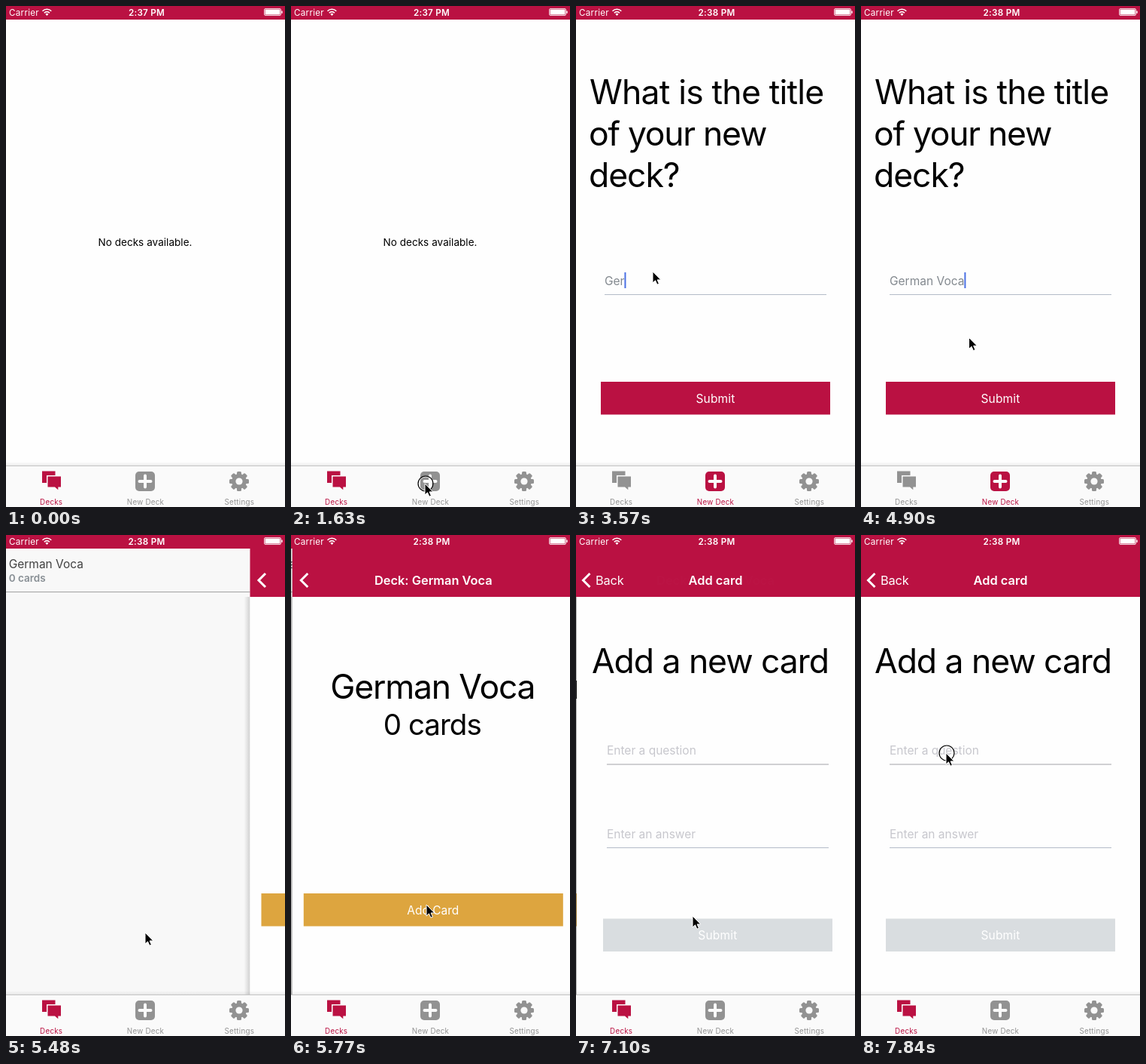
Recreate the animation shown at these times as an HTML page. Size 371 by 664 pixels, loop 7.99 s.

```html
<!DOCTYPE html>
<html lang="en">
<head>
<meta charset="utf-8">
<title>Flashcards</title>
<style>
html, body { margin: 0; height: 100%; overflow: hidden; background: #fefefe; }
svg { display: block; width: 371px; height: 664px; overflow: hidden; }
text { font: 15.5px Inter, Roboto, sans-serif; font-optical-sizing: none; white-space: pre; }
.mid { text-anchor: middle; }
.big { font-size: 44.5px; letter-spacing: -1.05px; }
.bar text { font-size: 16.4px; fill: #fff; }
.bar .title { font-weight: 600; }
.status text { font-size: 11.7px; letter-spacing: .25px; fill: #fff; }
.tab text { font-size: 9.8px; letter-spacing: .25px; }
.tab { fill: #929292; }
.tab.on, .red { fill: #ba1142; }
.page { fill: #fefefe; }
.hint { fill: #c7c7cd; }
.off { fill: #d9dde0; }
.white { fill: #fff; }
.rule { stroke: #b4bcc8; }
</style>
</head>
<body>
<svg viewBox="0 0 371 664">
  <defs>
    <linearGradient id="side"><stop stop-opacity="0"/><stop offset="1" stop-opacity=".16"/></linearGradient>
    <linearGradient id="up" x2="0" y2="1"><stop stop-opacity="0"/><stop offset="1" stop-opacity=".08"/></linearGradient>
  </defs>
  <rect class="page" width="371" height="664"/>

  <text id="empty" class="mid" x="185" y="318" style="font-size:13.5px;letter-spacing:.05px">No decks available.</text>

  <g id="form">
    <text class="big" x="18" y="130" style="letter-spacing:-.8px">What is the title</text>
    <text class="big" x="17" y="185" style="letter-spacing:-1.25px">of your new</text>
    <text class="big" x="17" y="240">deck?</text>
    <text id="hint" class="hint" x="38" y="370">Enter a title</text>
    <text id="typed" x="38" y="370" fill="#83898f"></text>
    <rect id="caret" y="353" width="2" height="21" fill="#4a70e4"/>
    <path class="rule" d="M38 382.5H333"/>
    <rect id="submit" x="33" y="498" width="305" height="43.5"/>
    <text class="mid white" x="185.5" y="525.5" style="letter-spacing:.2px">Submit</text>
  </g>

  <g id="list">
    <g id="listBody">
      <text x="17" y="44" fill="#444">German Voca</text>
      <text x="17" y="62" fill="#8b9298" style="font-size:13.5px;font-weight:600">0 cards</text>
      <path d="M0 75.5H400" stroke="#a4a4a4"/>
    </g>
    <rect id="listShade" y="18" width="371" height="592"/>
  </g>

  <g id="deck">
    <rect x="-10" y="82" width="8" height="528" fill="url(#side)"/>
    <rect class="page" x="-2" y="18" width="373" height="592"/>
    <g id="deckBody">
      <text class="big mid" x="184.5" y="217" style="letter-spacing:-1.2px">German Voca</text>
      <text class="mid" x="184" y="265" style="font-size:38.5px;letter-spacing:-1px">0 cards</text>
      <rect x="13" y="475" width="345" height="43.5" fill="#dda53f"/>
      <text class="mid white" x="185" y="502.5">Add Card</text>
    </g>
    <rect id="deckShade" y="82" width="371" height="528"/>
    <g id="card">
      <rect x="-10" y="82" width="8" height="528" fill="url(#side)"/>
      <rect class="page" x="-2" y="82" width="373" height="528"/>
      <text class="big" x="18" y="183">Add a new card</text>
      <text class="hint" x="38" y="291">Enter a question</text>
      <path d="M38 304H333" stroke="#d0d0d3" stroke-width="2"/>
      <text class="hint" x="38" y="402">Enter an answer</text>
      <path class="rule" d="M38 414.5H333"/>
      <rect class="off" x="33" y="508.5" width="305" height="43.5"/>
      <text class="mid white" x="185.5" y="536" style="letter-spacing:.2px">Submit</text>
    </g>
    <g class="bar">
      <rect class="red" x="-2" y="17" width="373" height="65"/>
      <path d="M18.5 51 9.5 60l9 9" fill="none" stroke="#fff" stroke-width="3"/>
      <text id="back" x="26" y="66" style="letter-spacing:-.2px">Back</text>
      <text id="deckTitle" class="title mid" x="185.5" y="65.5">Deck: German Voca</text>
      <text id="cardTitle" class="title mid" x="185.5" y="65.5">Add card</text>
    </g>
  </g>

  <g class="status">
    <rect class="red" width="371" height="18"/>
    <text x="4" y="12.5">Carrier</text>
    <path d="M48.5 6.7a8.3 8.3 0 0 1 11.8 0M50.8 9.2a5 5 0 0 1 7.2 0" fill="none" stroke="#fff" stroke-width="1.6"/>
    <path class="white" d="M52.4 10.8a2.9 2.9 0 0 1 4 0l-2 2.2z"/>
    <text id="clock" class="mid" x="187" y="12.5" style="font-weight:600"></text>
    <rect x="343.5" y="3.5" width="22" height="9" rx="1.5" fill="none" stroke="#fff" stroke-width=".8"/>
    <path class="white" d="M344.5 4.5h20v7h-20zM366.3 6.5h1.4v3.2h-1.4z"/>
  </g>

  <rect y="604" width="371" height="6" fill="url(#up)"/>
  <rect y="609" width="371" height="55" fill="#fafafa"/>
  <path d="M0 609.5H371" stroke="#c4c4c4"/>
  <g class="tab" id="decksTab">
    <path d="M48 616.5h17.5v5.5H54v10h-6zM55.5 623.5H73v14h-3.7v3.8l-4.3-3.8h-9.5z"/>
    <text class="mid" x="60.2" y="661">Decks</text>
  </g>
  <g class="tab" id="newTab">
    <rect x="172" y="617" width="26" height="26" rx="5"/>
    <path d="M177.5 630h15M185 622.5v15" stroke="#fafafa" stroke-width="4" stroke-linecap="round"/>
    <text class="mid" x="185.5" y="661">New Deck</text>
  </g>
  <g class="tab">
    <circle cx="310" cy="630" r="10"/>
    <g id="teeth"></g>
    <circle cx="310" cy="630" r="4.6" fill="#fafafa"/>
    <text class="mid" x="310.3" y="661">Settings</text>
  </g>

  <g id="pointer">
    <g id="ring" fill="none">
      <circle cx="1" r="9" stroke="#fff" stroke-opacity=".8"/>
      <circle cx="1" r="10" stroke="#000" stroke-width="1.2"/>
    </g>
    <path d="M0 0v15l3.5-3.2 2.4 5.4 2.5-1.1-2.3-5.2h4.7z" stroke="#fff" stroke-width="1"/>
  </g>
</svg>
<script>
const LOOP = 7990, STEP = 148, WIDTH = 371;
const $ = id => document.getElementById(id);
const show = (id, on) => $(id).style.display = on ? '' : 'none';
const slide = (id, x, y = 0) => $(id).setAttribute('transform', `translate(${x} ${y})`);
const opacity = (id, v) => $(id).style.opacity = v;

// Pointer waypoints: step, x, y
const path = [[3, 340, 218], [4, 290, 300], [5, 225, 412], [6, 185, 484], [7, 185, 484],
  [10, 178, 633], [14, 178, 633], [18, 102, 352], [32, 102, 352], [34, 185, 527],
  [37, 185, 527], [39, 180, 490], [40, 180, 490], [44, 155, 505], [48, 155, 505], [52, 113, 289]];
const clicks = [11, 19, 35, 45, 53];
const typing = [[24, 'Ger'], [25, 'Germ'], [26, 'Germa'], [27, 'German '],
  [29, 'German V'], [30, 'German Vo'], [31, 'German Voca']];

$('teeth').innerHTML = [0, 45, 90, 135].map(a =>
  `<rect x="307" y="617" width="6" height="26" rx="1.5" transform="rotate(${a} 310 630)"/>`).join('');

function pointerAt(step) {
  const i = path.findIndex(p => p[0] > step);
  if (i < 0) return path[path.length - 1].slice(1);
  if (!i) return path[0].slice(1);
  const [a, b] = [path[i - 1], path[i]], k = (step - a[0]) / (b[0] - a[0]);
  return [1, 2].map(j => a[j] + (b[j] - a[j]) * k);
}

function pushed(time, start) {
  const k = Math.min(1, Math.max(0, (time - start) / 515));
  return 1 - (1 - k) ** 5;
}

function draw(now) {
  const step = Math.floor((now % LOOP + 6) / STEP), time = step * STEP;
  const onForm = step >= 12 && step < 36;
  show('empty', step < 12);
  show('form', onForm);
  show('list', step >= 36);
  $('newTab').classList.toggle('on', onForm);
  $('decksTab').classList.toggle('on', !onForm);
  $('clock').textContent = step < 17 ? '2:37 PM' : '2:38 PM';

  const word = typing.filter(t => t[0] <= step).pop()?.[1] || '';
  $('typed').textContent = word;
  show('hint', !word);
  show('caret', step >= 20);
  if (onForm) $('caret').setAttribute('x', 38 + (word && $('typed').getComputedTextLength()));
  $('submit').setAttribute('class', word ? 'red' : 'off');

  const p = pushed(time, 5463), q = pushed(time, 6785);
  show('deck', p > 0);
  slide('deck', WIDTH * (1 - p));
  slide('listBody', -.3 * WIDTH * p);
  opacity('listShade', .18 * p);
  show('card', q > 0);
  slide('card', WIDTH * (1 - q));
  slide('deckBody', -.3 * WIDTH * q);
  opacity('deckShade', .18 * q);
  opacity('deckTitle', 1 - q);
  opacity('cardTitle', q * q);
  opacity('back', q);
  const tone = 255 * q;
  $('back').style.fill = `rgb(${tone},${tone},${tone})`;

  show('pointer', step >= 3);
  slide('pointer', ...pointerAt(step));
  show('ring', clicks.includes(step));
}

const start = performance.now();
(function tick() {
  draw(performance.now() - start);
  requestAnimationFrame(tick);
})();
</script>
</body>
</html>
```
